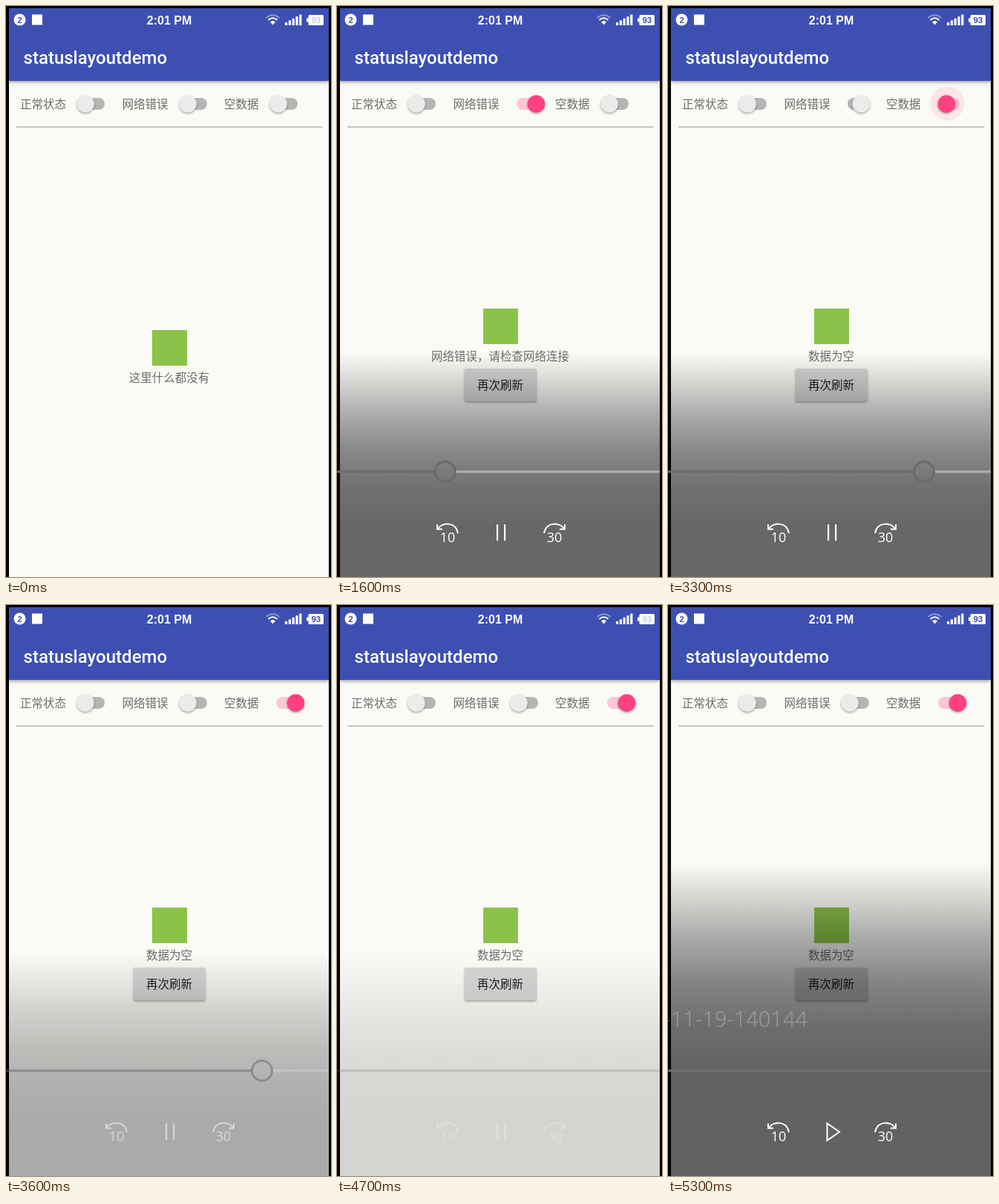
Animation of 438x770 px, one loop 5.4 s. Source, as an HTML page with a canvas:

```html
<!DOCTYPE html>
<html lang="zh-CN">
<head>
<meta charset="utf-8">
<title>statuslayoutdemo</title>
<style>
  html, body { margin: 0; width: 100%; height: 100%; overflow: hidden; background: #000; }
  canvas { display: block; width: 438px; height: 770px; }
</style>
</head>
<body>
<canvas id="stage" width="438" height="770"></canvas>
<script>
const ctx = document.getElementById('stage').getContext('2d');
const LOOP = 5400, STEP = 100;
const BLUE = '#3d50b2', PINK = '#ff4081', PAPER = '#fafbf7';
const CJK = '"Noto Sans CJK SC", "Noto Sans CJK", sans-serif';
const SANS = '"Liberation Sans", sans-serif';
const LIGHT = '"Open Sans", sans-serif';

const NORMAL = 0, ERROR = 1, EMPTY = 2;
const SWITCHES = [
  { label: '正常状态', labelX: 19, x: 107 },
  { label: '网络错误', labelX: 156.5, x: 245 },
  { label: '空数据', labelX: 294, x: 367 },
];
const EVENTS = [
  { at: 200, state: NORMAL }, { at: 1000, state: ERROR }, { at: 1750, state: EMPTY },
  { at: 2500, state: NORMAL }, { at: 2900, state: ERROR }, { at: 3200, state: EMPTY },
];

const clamp = v => Math.max(0, Math.min(1, v));
const smooth = v => { v = clamp(v); return v * v * (3 - 2 * v); };

function text(str, x, y, font, color, align = 'left') {
  ctx.font = font;
  ctx.fillStyle = color;
  ctx.textAlign = align;
  ctx.fillText(str, x, y);
}

function rect(x, y, w, h, color, radius = 0) {
  ctx.fillStyle = color;
  ctx.beginPath();
  ctx.roundRect(x, y, w, h, radius);
  ctx.fill();
}

function disc(x, y, r, color) {
  ctx.fillStyle = color;
  ctx.beginPath();
  ctx.arc(x, y, r, 0, 2 * Math.PI);
  ctx.fill();
}

function stroke(path, color, width) {
  ctx.strokeStyle = color;
  ctx.lineWidth = width;
  ctx.stroke(new Path2D(path));
}

function withShadow(blur, offset, draw) {
  ctx.save();
  ctx.shadowColor = 'rgba(0,0,0,.35)';
  ctx.shadowBlur = blur;
  ctx.shadowOffsetY = offset;
  draw();
  ctx.restore();
}

function drawHeader(t) {
  withShadow(4, 2, () => rect(4, 3, 431, 98, BLUE));
  disc(18.5, 18.5, 8, '#fff');
  text('2', 18.5, 22.5, 'bold 11px ' + SANS, BLUE, 'center');
  rect(35, 11.5, 14, 14, '#fff');
  text('2:01 PM', 220, 25, 'bold 16px ' + SANS, '#fff', 'center');

  stroke('M350.5 16 Q359.5 8.5 368.5 16', 'rgba(255,255,255,.4)', 2);
  stroke('M353.5 19 Q359.5 13.5 365.5 19', '#fff', 2);
  ctx.fillStyle = '#fff';
  ctx.fill(new Path2D('M356 21.5 Q359.5 18.5 363 21.5 L359.5 25.5Z'));
  for (let i = 0; i < 5; i++) {
    const h = 4 + i * 2.6;
    rect(376 + i * 4.8, 26 - h, 3.2, h, '#fff');
  }

  // The charge figure dims for part of each 2.3 s cycle.
  const phase = (t + 400) % 2300;
  const dim = phase < 550 ? 1 : phase < 650 ? 0.5 : phase >= 2200 ? 0.5 : 0;
  rect(407.5, 12, 20.5, 14, '#fff', 1.5);
  rect(405, 16.5, 3, 5, '#fff');
  text('93', 417.8, 23.2, 'bold 11.5px ' + SANS, `rgba(61,80,178,${1 - 0.72 * dim})`, 'center');

  text('statuslayoutdemo', 23.5, 77.5, '500 24px Roboto, sans-serif', '#fff');
}

function drawSwitch(sw, on, wasOn, age) {
  const p = smooth(age / 250);
  const x = sw.x + 23.5 * (wasOn + (on - wasOn) * p);
  text(sw.label, sw.labelX, 138, '15.5px ' + CJK, '#6c6d6b');
  rect(sw.x - 3, 124, 29, 16, on ? 'rgba(255,64,129,.28)' : '#b5b6b4', 8);
  if (on && !wasOn && age < 250)
    disc(x + 1, 131.5, 23, `rgba(255,64,129,${0.12 * clamp((250 - age) / 150)})`);
  withShadow(3, 1.5, () => disc(x, 132, 11.8, on ? PINK : '#ebecea'));
}

function drawMessage(message, top, hasButton) {
  rect(197, top, 47, 48, '#8bc34a');
  text(message, 220, top + 69.5, '15.5px ' + CJK, '#6c6d6b', 'center');
  if (!hasButton) return;
  withShadow(3, 1.5, () => rect(172, 489, 96.5, 44, '#d6d7d5', 2));
  text('再次刷新', 220, 517, '15.5px ' + CJK, '#1c1c1c', 'center');
}

function drawContent(state) {
  if (state === NORMAL) {
    for (let i = 0; i < 10; i++)
      text('Data NO.' + i, 23.5, 209 + i * 57.55, '17.4px ' + SANS, '#1c1c1c');
  } else if (state === ERROR) {
    drawMessage('网络错误，请检查网络连接', 408, true);
  } else if (state === EMPTY) {
    drawMessage('数据为空', 408, true);
  } else {
    drawMessage('这里什么都没有', 437, false);
  }
}

function drawShade(top, full, strength) {
  const g = ctx.createLinearGradient(0, top, 0, full);
  const stops = [[0, 0], [0.16, 0.14], [0.35, 0.31], [0.57, 0.46], [0.78, 0.55], [1, 0.59]];
  for (const [at, alpha] of stops) g.addColorStop(at, `rgba(0,0,0,${alpha * strength})`);
  ctx.fillStyle = g;
  ctx.fillRect(4, top, 431, 770 - top);
}

function drawSkip(x, seconds, flip) {
  ctx.save();
  ctx.translate(x, 0);
  ctx.scale(flip, 1);
  stroke('M-13.5 705 C-7 696 11 695 14 711 M-14 699 V705.5 H-7', '#fff', 2);
  ctx.restore();
  text(seconds, x, 723, '18px ' + LIGHT, '#fff', 'center');
}

function drawPlayer(t) {
  let alpha = 0;
  if (t < 3400) alpha = smooth(t / 500);
  else if (t < 4000) alpha = Math.pow((4000 - t) / 600, 1.5);
  else if (t > 4550) alpha = smooth((t - 4550) / 450);
  if (!alpha) return;

  const ended = t < 5200 ? 0 : t < 5300 ? 0.5 : 1;
  drawShade(468 - 120 * ended, 700 - 68 * ended, alpha * (1 + 0.03 * ended));

  ctx.globalAlpha = alpha;
  const played = '#6a6a6a';
  if (t < 4500) {
    const ticks = Math.max(0, Math.floor((t - 483) / 266.7));
    const x = t >= 3200 ? 345 : 27 + 29.7 * ticks;
    rect(0, 626.5, x - 14, 3, played);
    rect(x + 14, 626.5, 435 - x - 14, 3, 'rgba(255,255,255,.4)');
    ctx.strokeStyle = played;
    ctx.lineWidth = 3;
    ctx.beginPath();
    ctx.arc(x, 628, 13.5, 0, 2 * Math.PI);
    ctx.stroke();
  } else {
    rect(0, 626.5, 435, 3, '#707070');
  }

  drawSkip(149, '10', 1);
  drawSkip(293, '30', -1);
  if (ended) {
    stroke('M214.5 699 L231 710.5 L214.5 722Z', '#fff', 2);
    text('7-11-19-140144', 188, 569, `300 29px ${LIGHT}`, `rgba(255,255,255,${0.32 * ended})`, 'right');
  } else {
    rect(215, 699, 2.2, 22, '#fff');
    rect(225, 699, 2.2, 22, '#fff');
  }
  ctx.globalAlpha = 1;
}

function draw(t) {
  const past = EVENTS.filter(e => e.at <= t);
  const current = past.at(-1) || { at: -1000, state: -1 };
  const previous = past.at(-2) || { state: -1 };

  ctx.fillStyle = '#000';
  ctx.fillRect(0, 0, 438, 770);
  rect(4, 3, 431, 767, PAPER);
  drawHeader(t);
  SWITCHES.forEach((sw, i) =>
    drawSwitch(sw, +(current.state === i), +(previous.state === i), t - current.at));
  rect(14, 162.5, 412.5, 1.3, '#a3a4a2');
  drawContent(current.state);
  drawPlayer(t);
}

function tick() {
  draw(Math.floor(performance.now() % LOOP / STEP) * STEP);
  requestAnimationFrame(tick);
}
tick();
</script>
</body>
</html>
```
